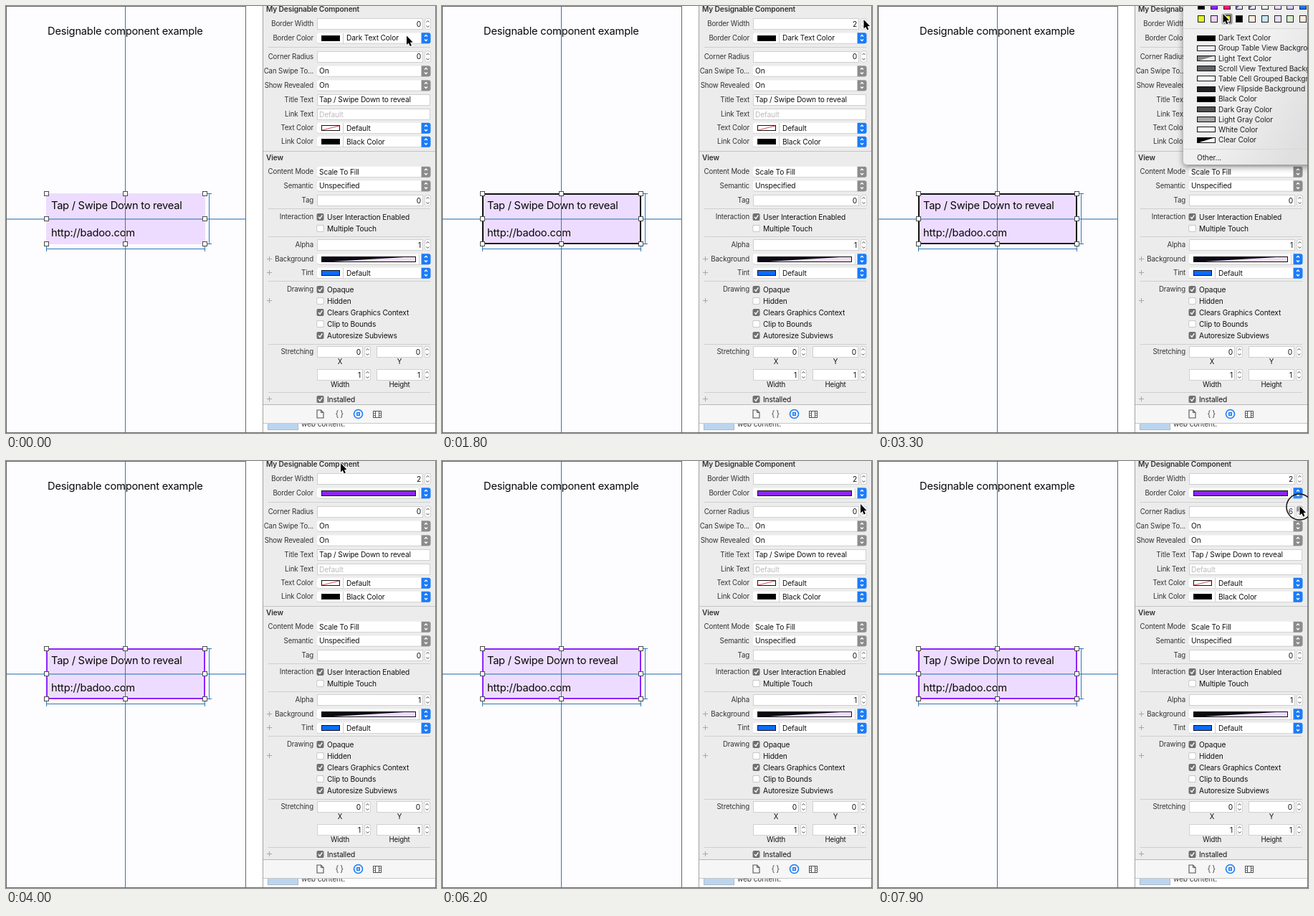
Animation, 600 px wide and 595 px high, one loop 8 s. Source, as an HTML page with a canvas:

```html
<!DOCTYPE html>
<html lang="en">
<head>
<meta charset="utf-8">
<title>Designable component</title>
<style>
html, body { margin: 0; width: 100%; height: 100%; overflow: hidden; background: #fff; }
canvas { display: block; width: 600px; height: 595px; }
</style>
</head>
<body>
<canvas id="stage"></canvas>
<script>
const W = 600, H = 595, LOOP = 8000, STEP = 100;
const canvas = document.getElementById('stage');
const c = canvas.getContext('2d');
const dpr = window.devicePixelRatio || 1;
canvas.width = W * dpr;
canvas.height = H * dpr;
c.scale(dpr, dpr);

const FONT = 'Inter, Roboto, sans-serif';
const BLUE = '#1b7cf8', GUIDE = '#2f78b8', LILAC = '#eddcff', PURPLE = '#8b25fb', INK = '#111';

function rect(x, y, w, h, fill) {
  c.fillStyle = fill;
  c.fillRect(x, y, w, h);
}

function frame(x, y, w, h, stroke, lw = 1) {
  c.strokeStyle = stroke;
  c.lineWidth = lw;
  c.strokeRect(x + lw / 2, y + lw / 2, w - lw, h - lw);
}

function rounded(x, y, w, h, r, fill) {
  c.beginPath();
  c.roundRect(x, y, w, h, r);
  c.fillStyle = fill;
  c.fill();
}

function poly(points, fill) {
  c.beginPath();
  points.forEach(([x, y]) => c.lineTo(x, y));
  c.closePath();
  c.fillStyle = fill;
  c.fill();
}

function line(points, stroke, lw = 1) {
  c.beginPath();
  points.forEach(([x, y]) => c.lineTo(x, y));
  c.strokeStyle = stroke;
  c.lineWidth = lw;
  c.stroke();
}

// y is the vertical middle of the capitals
function text(s, x, y, { size = 10.2, align = 'left', color = INK, weight = 400, gap = -0.14 } = {}) {
  c.font = `${weight} ${size}px ${FONT}`;
  c.letterSpacing = gap + 'px';
  c.textAlign = align;
  c.fillStyle = color;
  c.fillText(s, x, y + size * 0.36);
}

const label = (s, y) => text(s, 429, y, { size: 9.7, align: 'right', color: '#333' });
const rule = (y, x = 366) => rect(x, y, 592 - x, 1, '#cfcfcf');

function field(x, y, w, value, color) {
  const top = Math.round(y) - 8;
  rect(x, top, w, 16, '#fff');
  frame(x, top, w, 16, '#d0d0d0');
  if (typeof value === 'number') text(value, x + w - 3, y, { align: 'right' });
  else text(value, x + 3, y, { color });
}

function arrows(x, y, d, color, lw = 1.1) {
  line([[x - 2, y - d], [x, y - d - 2], [x + 2, y - d]], color, lw);
  line([[x - 2, y + d], [x, y + d + 2], [x + 2, y + d]], color, lw);
}

function stepper(x, y, pressed) {
  rounded(x, y - 8, 9, 16, 4, '#c4c4c4');
  rounded(x + 0.7, y - 7.3, 7.6, 14.6, 3.4, '#fff');
  if (pressed) rounded(x, y - 8, 9, 8, [4, 4, 0, 0], '#8d8d8d');
  arrows(x + 4.5, y, 2.5, '#444', 1);
}

function number(y, value, pressed, x = 434, w = 148) {
  field(x, y, w, value);
  stepper(x + w + 2, y, pressed);
}

function popup(y, value, color = '#8c8c8c', x = 437) {
  rounded(434, y - 7, 158, 15, 3, '#c6c6c6');
  rounded(434, y - 7.3, 158, 14.6, 3, '#fff');
  rounded(579.5, y - 7.3, 13, 15, [0, 3, 3, 0], color);
  arrows(586, y, 2, '#fff', 1.3);
  if (value) text(value, x, y);
}

function swatch(x, y, w, fill, corner) {
  const top = Math.round(y) - 4;
  rect(x, top, w, 8, fill);
  if (corner) poly([[x, top], [x + w, top], [x, top + 8]], corner);
  frame(x, top, w, 8, '#111');
}

function colorPopup(y, name, fill, corner) {
  popup(y, name, BLUE, 475);
  swatch(440, y, name ? 26 : 132, fill, corner);
  rect(name ? 470 : 576, Math.round(y) - 7, 1, 14, '#cdcdcd');
}

function check(y, name, on) {
  rounded(433.5, y - 5, 10, 10, 2, on ? '#707070' : '#b9b9b9');
  if (on) line([[436, y], [438, y + 2.4], [441.3, y - 2.7]], '#fff', 1.4);
  else rounded(434.2, y - 4.3, 8.6, 8.6, 1.6, '#fff');
  text(name, 448, y);
}

function plus(y) {
  const mid = Math.round(y);
  rect(364, mid - 1, 7, 1, '#a8a8a8');
  rect(367, mid - 4, 1, 7, '#a8a8a8');
}

function drawCanvasSide(s) {
  rect(0, 0, 358, H, '#fff');
  rect(0, 0, 334, H, '#fdfcff');
  rect(56, 261, 222, 71, LILAC);
  if (s.border) {
    const b = s.border;
    c.beginPath();
    c.roundRect(56 + b / 2, 261 + b / 2, 222 - b, 71 - b, s.radius * 0.4);
    c.strokeStyle = s.purple ? PURPLE : '#111';
    c.lineWidth = b;
    c.stroke();
  }
  const big = { size: 14.7, gap: -0.22, color: '#080808' };
  text('Designable component example', 58, 35, big);
  text('Tap / Swipe Down to reveal', 63, 278, { ...big, gap: -0.27 });
  text('http://badoo.com', 63, 316, big);

  rect(166, 0, 1, H, GUIDE);
  rect(0, 296.4, 334, 1.1, GUIDE);
  rect(283, 261, 1, 71, GUIDE);
  rect(280, 261, 7, 1, GUIDE);
  rect(280, 331, 7, 1, GUIDE);
  rect(56, 338, 222, 1, GUIDE);
  rect(56, 335, 1, 7, GUIDE);
  rect(277, 335, 1, 7, GUIDE);
  for (const x of [56, 166, 277]) {
    for (const y of [261, 296, 331]) {
      if (x === 166 && y === 296) continue;
      rect(x - 3, y - 3, 7, 7, '#fff');
      frame(x - 3, y - 3, 7, 7, '#4a4a4a');
    }
  }
  frame(0, 0, 335, H, '#666');
}

function drawInspector(s) {
  rect(358, 0, 242, H, '#ececec');
  text('My Designable Component', 363, 4, { weight: 600, color: '#333' });
  if (s.hide) text('Hide', 594, 4, { align: 'right', weight: 600, color: '#999' });
  label('Border Width', 25);
  number(25, s.border, s.press === 'border');
  label('Border Color', 44.5);
  if (s.purple) colorPopup(44.5, '', PURPLE);
  else colorPopup(44.5, 'Dark Text Color', '#000');
  rule(57);
  label('Corner Radius', 70.5);
  number(70.5, s.radius, s.press === 'radius');
  label('Can Swipe To...', 90.5);
  popup(90.5, 'On');
  label('Show Revealed', 110.5);
  popup(110.5, 'On');
  label('Title Text', 130.5);
  field(434, 130.5, 158, 'Tap / Swipe Down to reveal');
  label('Link Text', 151);
  field(434, 151, 158, 'Default', '#bbb');
  label('Text Color', 170);
  colorPopup(170, 'Default', '#fff');
  line([[441, 173], [465, 167]], '#e0485a');
  label('Link Color', 189);
  colorPopup(189, 'Black Color', '#000');

  rect(359, 202, 240, 1, '#c4c4c4');
  text('View', 363, 211, { weight: 600, color: '#333' });
  label('Content Mode', 231);
  popup(231, 'Scale To Fill');
  label('Semantic', 250.5);
  popup(250.5, 'Unspecified');
  label('Tag', 271);
  number(271, 0);
  rule(282);
  label('Interaction', 294);
  check(294, 'User Interaction Enabled', true);
  check(310, 'Multiple Touch', false);
  rule(321);
  label('Alpha', 333);
  number(333, 1);
  label('Background', 352.5);
  colorPopup(352.5, '', LILAC, '#0c0814');
  label('Tint', 372);
  colorPopup(372, 'Default', '#0a6cff');
  rule(383);
  label('Drawing', 395);
  check(395, 'Opaque', true);
  check(411, 'Hidden', false);
  check(427, 'Clears Graphics Context', true);
  check(443, 'Clip to Bounds', false);
  check(459, 'Autoresize Subviews', true);
  rule(471);
  label('Stretching', 482);
  [[482, 0, 'X', 'Y', 495.7], [514, 1, 'Width', 'Height', 527.3]].forEach(([y, value, left, right, ty]) => {
    number(y, value, false, 434, 64);
    number(y, value, false, 517, 64);
    text(left, 466, ty, { align: 'center', size: 9.7 });
    text(right, 549, ty, { align: 'center', size: 9.7 });
  });
  rule(538);
  check(548, 'Installed', true);
  [352.5, 372, 411, 548].forEach(plus);
}

function drawLibrary() {
  rect(359, 555, 240, 40, '#fff');
  rect(365, 570, 43, 21, '#a9b9cc');
  rect(366, 570, 41, 20, '#bcd5ee');
  text('web content.', 412, 582.3, { color: '#333' });
  rect(359, 555, 240, 26, '#f6f6f6');
  rect(359, 555, 240, 1, '#b8b8b8');
  rect(359, 581, 240, 1, '#c8c8c8');

  const gray = '#555';
  line([[434, 563], [439.5, 563], [443, 566.5], [443, 574], [434, 574], [434, 562.5]], gray, 1.1);
  line([[439.5, 563], [439.5, 566.5], [443, 566.5]], gray);
  text('{ }', 465, 568, { size: 11.5, align: 'center', color: gray, gap: -0.6 });
  c.beginPath();
  c.arc(491.5, 568.5, 6, 0, Math.PI * 2);
  c.strokeStyle = BLUE;
  c.lineWidth = 1.6;
  c.stroke();
  frame(489, 566, 5, 5, BLUE, 1.5);
  frame(512, 564, 12, 10, gray);
  line([[515.5, 564], [515.5, 574]], gray);
  line([[520.5, 564], [520.5, 574]], gray);
  for (const y of [567.5, 570.5]) {
    line([[512, y], [515.5, y]], gray, 0.7);
    line([[520.5, y], [524, y]], gray, 0.7);
  }
}

const MENU = [
  ['Dark Text Color', '#000'],
  ['Group Table View Background Color', '#efeff4'],
  ['Light Text Color', '#e8e8e8', '#888'],
  ['Scroll View Textured Background Color', '#626468'],
  ['Table Cell Grouped Background Color', '#fff'],
  ['View Flipside Background Color', '#1f2124'],
  ['Black Color', '#000'],
  ['Dark Gray Color', '#505050'],
  ['Light Gray Color', '#a5a5a5'],
  ['White Color', '#fff'],
  ['Clear Color', '#fff', '#000']
];
const RECENT = [
  ['#000', PURPLE, '#ff1478', '#e4e2f6', '#ececfa', '#f4f4f4', LILAC, '#d9d0fb', '#1673f0'],
  ['#e2f22c', '#efd0fb', '#fff200', '#000', '#fdebd9', '#c3e8f4', '#e8def8', '#d5efca', '#fdeedb']
];

function drawMenu(x, y) {
  const glass = c.createLinearGradient(520, 100, 610, 150);
  glass.addColorStop(0, '#f0f0f0');
  glass.addColorStop(1, '#dfdfe0');
  c.save();
  c.shadowColor = 'rgba(0,0,0,.45)';
  c.shadowBlur = 10 * dpr;
  c.shadowOffsetY = 3 * dpr;
  rounded(426, -20, 200, 241, 5, glass);
  c.restore();
  RECENT.forEach((row, r) => row.forEach((fill, i) => {
    const sx = Math.round(446 + i * 17.75), sy = r * 18 - 5;
    if (Math.abs(x + 2 - sx - 5) < 8 && Math.abs(y + 3 - sy - 5) < 9) {
      rounded(sx - 2.5, sy - 2.5, 15, 15, 2, '#8f8f8f');
    }
    rect(sx, sy, 10, 10, fill);
    if (!r && (i === 3 || i === 4)) poly([[sx, sy], [sx + 10, sy], [sx, sy + 10]], '#6b56a8');
    frame(sx, sy, 10, 10, '#222');
  }));
  rect(426, 31, 174, 1, '#d8d8d8');
  MENU.forEach(([name, fill, corner], i) => {
    const my = 44.5 + i * 14.2;
    const on = Math.abs(y - my) < 7.1;
    if (on) rect(426, my - 7, 174, 14, '#979797');
    swatch(445, my, 26, fill, corner);
    text(name, 475, my, { color: on ? '#fff' : '#222' });
  });
  rect(426, 199, 174, 1, '#d8d8d8');
  text('Other...', 445, 211.5, { color: '#222' });
}

// time, x, y of the pointer tip
const PATH = [
  [0, 559, 41.5], [200, 560, 40], [900, 588.5, 19], [1900, 588.5, 19], [2200, 585, 43],
  [2600, 584, 42], [2700, 582, 41], [3300, 481.5, 11], [3600, 467, 2], [4000, 467, 3],
  [4500, 470.5, 17], [4800, 474, 20], [5600, 582, 58], [6200, 584, 60], [6600, 588.5, 63], [LOOP, 588.5, 63]
];

function pointer(t) {
  let i = 1;
  while (PATH[i][0] < t) i++;
  const [t0, x0, y0] = PATH[i - 1], [t1, x1, y1] = PATH[i];
  const p = (t - t0) / (t1 - t0), e = p * p * (3 - 2 * p);
  return [x0 + (x1 - x0) * e, y0 + (y1 - y0) * e];
}

function drawPointer(x, y, ring) {
  if (ring) {
    c.beginPath();
    c.arc(x - 0.5, y + 1, 18, 0, Math.PI * 2);
    c.fillStyle = 'rgba(255,255,255,.12)';
    c.fill();
    c.strokeStyle = '#111';
    c.lineWidth = 1.5;
    c.stroke();
  }
  const shape = [[0, 0], [0, 12.5], [2.8, 9.9], [4.8, 14.4], [6.9, 13.5], [5, 9.2], [8.6, 9]]
    .map(([a, b]) => [x + a, y + b]);
  c.lineJoin = 'round';
  line([...shape, shape[0]], '#fff', 2);
  poly(shape, '#000');
  c.lineJoin = 'miter';
}

function stateAt(t) {
  const clicks = Math.max(0, Math.floor((t - 6700) / 200));
  let press = '';
  if (t === 1200 || t === 1500) press = 'border';
  if (t >= 6900 && (t - 6900) % 200 === 0) press = 'radius';
  return {
    border: (t >= 1200) + (t >= 1500),
    radius: clicks,
    purple: t >= 3900,
    menu: t >= 2300 && t < 3900,
    hide: t >= 4100 && t < 4900,
    press,
    ring: press || t === 2200 || t === 3700
  };
}

function draw(t) {
  const s = stateAt(t);
  const [x, y] = pointer(t);
  c.clearRect(0, 0, W, H);
  drawCanvasSide(s);
  drawInspector(s);
  drawLibrary();
  if (s.menu) drawMenu(x, y);
  rect(358, 0, 1, H, '#a2a2a2');
  rect(599, 0, 1, H, '#777');
  rect(0, 594, W, 1, '#6a6a6a');
  drawPointer(x, y, s.ring);
}

const start = performance.now();
function tick(now) {
  const t = Math.max(0, now - start) % LOOP;
  draw(Math.floor(t / STEP) * STEP);
  requestAnimationFrame(tick);
}
draw(0);
requestAnimationFrame(tick);
</script>
</body>
</html>
```
